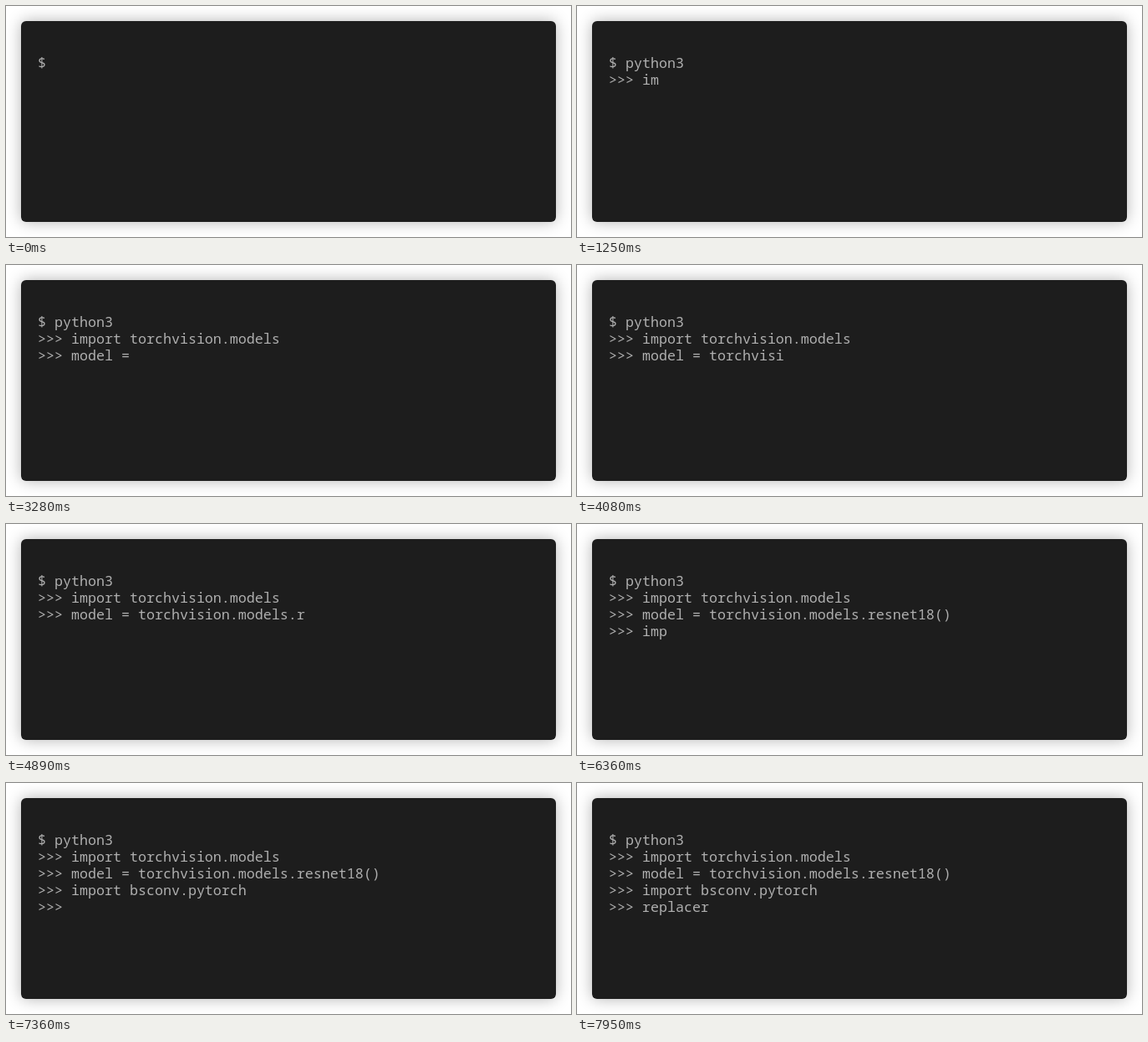
Write an HTML page that moves like this. It is 676x276 px and loops after 8 s.

```html
<!DOCTYPE html>
<html lang="en">
<head>
<meta charset="utf-8">
<title>Terminal session</title>
<style>
  html, body { margin: 0; width: 100%; height: 100%; overflow: hidden; background: #fff; }
  .window {
    position: absolute; left: 18px; top: 18px; width: 640px; height: 240px;
    border-radius: 6px; background: #1d1d1d; box-shadow: 0 0 18px rgba(0, 0, 0, .3);
  }
  svg { position: absolute; left: 0; top: 0; }
  text {
    font: 16.667px "Noto Sans Mono", "DejaVu Sans Mono", monospace;
    fill: #afafaf; white-space: pre;
  }
</style>
</head>
<body>
<div class="window"></div>
<svg width="676" height="276" id="screen"></svg>
<script>
const LOOP = 8000;

// Each burst of typing: [text, time of first key, time of last key].
// A single time prints the whole text at once.
const lines = [
  [['$ ', 0], ['python3', 380, 670]],
  [['>>> ', 860], ['import', 1190, 1420], [' ', 1500], ['torchvision', 1660, 2060], ['.models', 2140, 2380]],
  [['>>> ', 2810], ['model', 3000, 3180], [' =', 3280], [' ', 3400], ['torch', 3480, 3760],
   ['vision.models.', 3900, 4610], ['re', 4890, 4910], ['snet', 4960, 5080],
   ['18', 5500, 5530], ['()', 5670, 5730]],
  [['>>> ', 5910], ['imp', 6240, 6360], ['ort', 6400, 6500], [' ', 6560],
   ['bsconv.pyto', 6620, 7040], ['rch', 7080, 7130]],
  [['>>> ', 7360], ['replacer', 7650, 7950]]
];

function typed([text, first, last], time) {
  if (time < first) return '';
  if (last === undefined) return text;
  const step = (last - first) / (text.length - 1);
  return text.slice(0, Math.floor((time - first) / step + 1e-6) + 1);
}

const rows = lines.map((_, i) => {
  const row = document.createElementNS('http://www.w3.org/2000/svg', 'text');
  row.setAttribute('x', 38);
  row.setAttribute('y', 74 + 20 * i);
  return document.getElementById('screen').appendChild(row);
});

function draw() {
  const time = performance.now() % LOOP;
  lines.forEach((bursts, i) => {
    const content = bursts.map(burst => typed(burst, time)).join('');
    if (rows[i].textContent !== content) rows[i].textContent = content;
  });
  requestAnimationFrame(draw);
}
draw();
</script>
</body>
</html>
```
